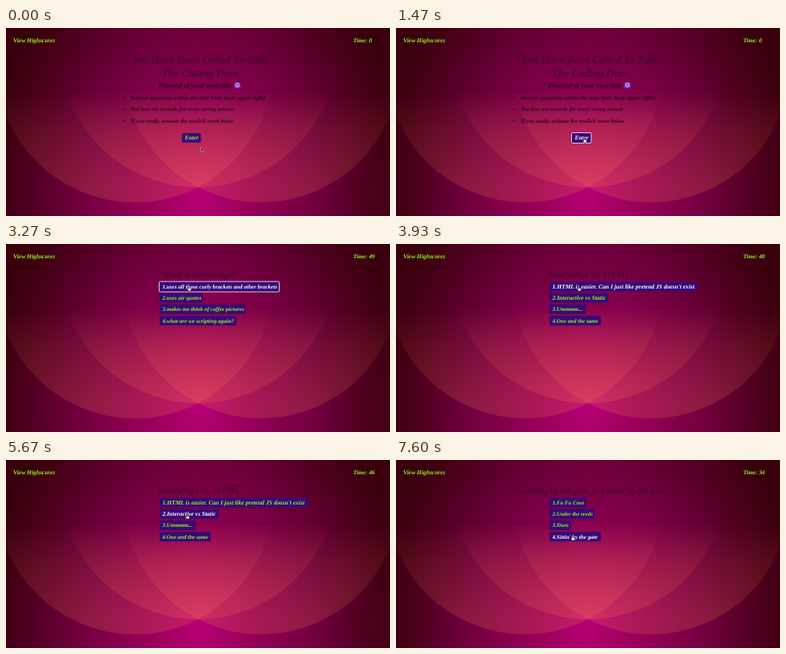
Recreate the animation shown at these times as an HTML page. Size 480 by 236 pixels, loop 8 s.

```html
<!DOCTYPE html>
<html lang="en">
<head>
<meta charset="utf-8">
<title>Coding quiz</title>
<style>
  html, body { margin: 0; width: 100%; height: 100%; overflow: hidden; background: #3a000e; }
  svg { display: block; width: 480px; height: 236px; }
  text { font: italic bold 7.1px "Liberation Serif", "Noto Serif", serif; text-rendering: geometricPrecision; }
  .lime { fill: #94f818; }
  .hover { fill: #fff; }
  .head { fill: #480832; }
  .note { fill: #2a0720; }
  .box { fill: #390978; }
  .focus { fill: none; stroke: #d8c4ec; stroke-width: 1; }
</style>
</head>
<body>
<svg viewBox="0 0 480 236">
  <defs>
    <radialGradient id="base" gradientUnits="userSpaceOnUse" cx="0" cy="0" r="1"
      gradientTransform="translate(240 205) scale(255 330)">
      <stop offset="0" stop-color="#b80074"/>
      <stop offset=".25" stop-color="#98005a"/>
      <stop offset=".6" stop-color="#6e003c"/>
      <stop offset=".85" stop-color="#4c001c"/>
      <stop offset="1" stop-color="#3a000e"/>
    </radialGradient>
    <linearGradient id="petal" gradientUnits="userSpaceOnUse" x1="0" y1="80" x2="0" y2="200">
      <stop offset="0" stop-color="#ff8448" stop-opacity="0"/>
      <stop offset=".4" stop-color="#ff8448" stop-opacity=".09"/>
      <stop offset="1" stop-color="#ff8448" stop-opacity=".19"/>
    </linearGradient>
  </defs>
  <rect width="480" height="236" fill="url(#base)"/>
  <g fill="url(#petal)">
    <circle cx="161" cy="46" r="173"/>
    <circle cx="319" cy="46" r="173"/>
    <circle cx="240" cy="27" r="173"/>
  </g>
  <text class="lime" x="9" y="17.5" style="font-size:7.6px">View Highscores</text>
  <text class="lime" id="time" x="434" y="17.5" style="font-size:7.4px"></text>
  <g id="page"></g>
  <g id="cursor" stroke-width=".6" stroke-linejoin="round">
    <path id="arrow" fill="#180818" stroke="#d8b8c8" d="M-1.5-3V2.2L-.3 1.2.6 3 1.5 2.6.7.8H2.3Z"/>
    <path id="hand" fill="#fff" stroke="#281030" d="M-1.2-3H-.2V-.8L2.2-.2 2.6.6 2 3H-1L-2.6.6-2.2 0-1.2.6Z"/>
  </g>
</svg>
<script>
const LOOP = 8000, START = 1600, PENALTY_AT = 6330;
const $ = id => document.getElementById(id);

const label = (s, x, y, size, cls, anchor = "start") =>
  `<text class="${cls}" x="${x}" y="${y}" text-anchor="${anchor}" style="font-size:${size}px">${s}</text>`;

// An option is [text, box width, font size]
const options = list => list.map(([s, w, size = 7.1], i) => ({ s, w, size, x: 192, y: 47.6 + i * 14.2 }));

const notes = [
  ["Answer questions within the time limit (look upper right)", 7.2],
  ["You lose ten seconds for every wrong answer", 7],
  ["If you ready, activate the onclick event below", 7]
];

const intro = label("You Have Been Called To Take", 242.5, 44, 13.4, "head", "middle") +
  label("The Coding Dare", 242.5, 60.5, 13.3, "head", "middle") +
  label("Proceed at your own risk", 190, 75, 8.95, "note") +
  `<rect x="285.5" y="68" width="7.5" height="7.5" rx="1.5" fill="#8238c4"/>
   <circle cx="289.2" cy="71.8" r="2" fill="none" stroke="#ecd8ff" stroke-width=".9"/>` +
  notes.map(([s, size], i) => `<circle class="note" cx="147" cy="${87.5 + i * 14.7}" r=".9"/>` +
    label(s, 156, 89.7 + i * 14.7, size, "note")).join("");

const question = (s, size) => label(s, 241, 42, size, "head", "middle");

const screens = [
  { from: 0, press: 1400, focus: 0, head: intro,
    items: [{ s: "Enter", w: 23.5, size: 7.4, x: 220, y: 132 }] },
  { from: START, press: 3270, focus: 0, head: question("What is JavaScript?", 11.1),
    items: options([
      ["1.uses all those curly brackets and other brackets", 149],
      ["2.uses air quotes", 54],
      ["3.makes me think of coffee pictures", 107, 7],
      ["4.what are we scripting again?", 96]
    ]) },
  { from: 3400, press: 6200, focus: 3, head: question("JavaScript vs. HTML", 11.8),
    items: options([
      ["1.HTML is easier. Can I just like pretend JS doesn't exist", 185, 7.55],
      ["2.Interactive vs Static", 73.5, 7.55],
      ["3.Ummmm...", 45],
      ["4.One and the same", 64, 7]
    ]) },
  { from: PENALTY_AT, press: Infinity, focus: 0,
    head: question("I'm sitting by the gate, just sittin' by the gate", 10.5),
    items: options([
      ["1.Fo Fo Cove", 46],
      ["2.Under the reeds", 56, 6.9],
      ["3.Dues", 27],
      ["4.Sittin' by the gate", 64]
    ]) }
];

// Pointer path: [time, x, y]
const path = [
  [0, 245, 153], [300, 245, 153], [730, 242, 149], [1200, 236, 141], [1700, 236, 141],
  [1930, 233, 108], [2080, 232, 104], [2200, 231, 54], [2930, 231, 54], [3070, 229, 56],
  [4930, 229, 56], [5070, 230, 56], [5400, 230, 56], [6070, 221, 98], [LOOP, 221, 98]
];

function pointer(t) {
  const i = path.findIndex(p => p[0] > t);
  const [t0, x0, y0] = path[i - 1], [t1, x1, y1] = path[i];
  const k = (t - t0) / (t1 - t0), e = k * k * (3 - 2 * k);
  return [x0 + (x1 - x0) * e, y0 + (y1 - y0) * e];
}

function seconds(t) {
  if (t < START) return 0;
  return 50 - Math.floor((t - START) / 1000) - (t >= PENALTY_AT ? 10 : 0);
}

function draw(now) {
  const t = now % LOOP, [px, py] = pointer(t);
  const screen = screens.findLast(s => t >= s.from);
  let over = false;
  const buttons = screen.items.map(({ s, w, size, x, y }, i) => {
    const hit = px >= x && px <= x + w && py >= y && py <= y + 12;
    over ||= hit;
    const ring = t >= screen.press && i === screen.focus
      ? `<rect class="focus" x="${x - .5}" y="${y - .5}" width="${w + 1}" height="13" rx="1"/>` : "";
    return `<rect class="box" x="${x}" y="${y}" width="${w}" height="12" rx="1"/>` + ring +
      label(s, x + 3.5, y + 8.3, size, hit ? "hover" : "lime");
  });
  $("page").innerHTML = screen.head + buttons.join("");
  $("time").textContent = "Time: " + seconds(t);
  $("cursor").setAttribute("transform", `translate(${px} ${py})`);
  $("hand").style.display = over ? "" : "none";
  $("arrow").style.display = over ? "none" : "";
  requestAnimationFrame(() => draw(performance.now()));
}
draw(performance.now());
</script>
</body>
</html>
```
